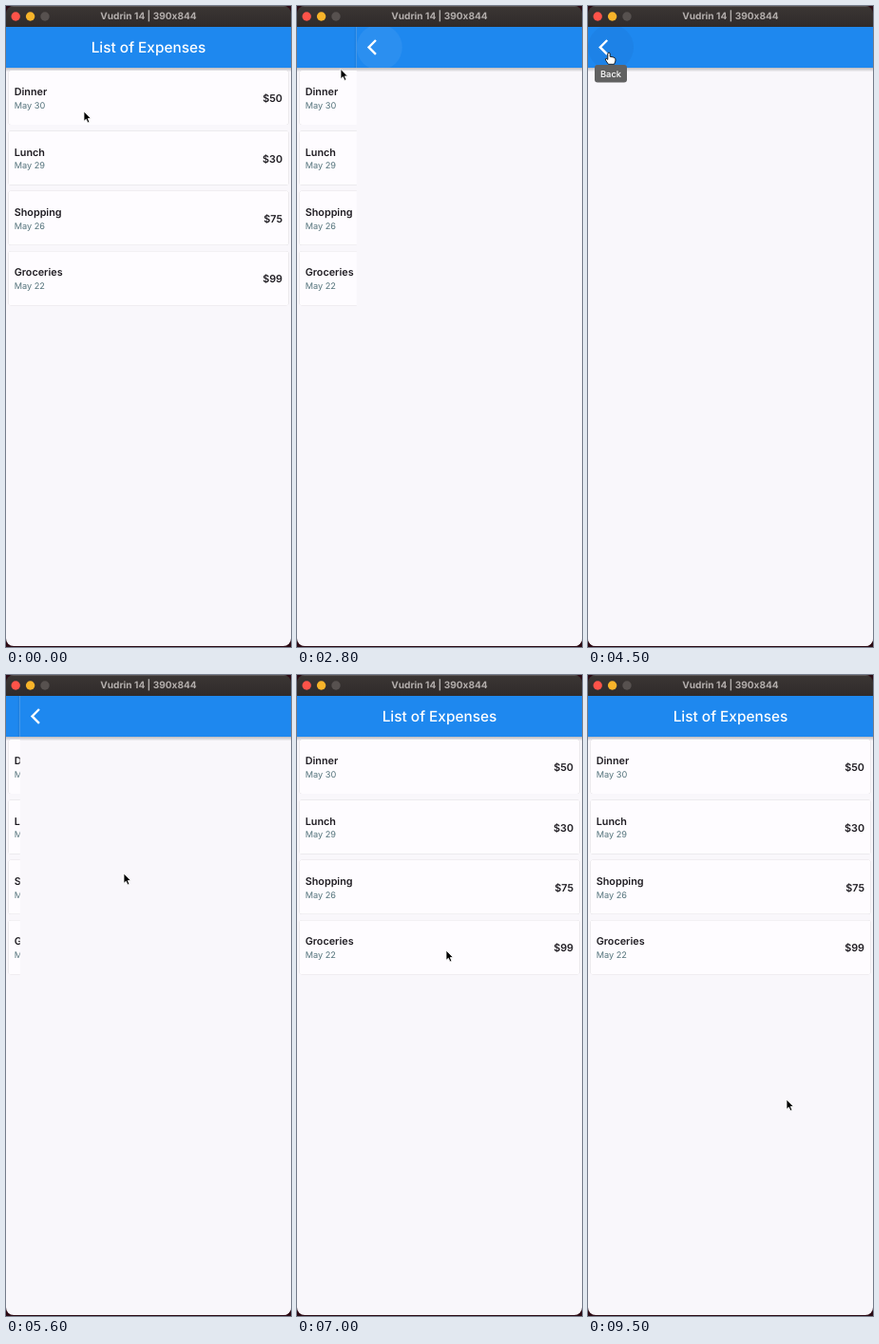
An HTML page that plays this animation: 300 by 675 pixels, repeating every 9.6 s.

```html
<!DOCTYPE html>
<html lang="en">
<head>
<meta charset="utf-8">
<title>List of Expenses</title>
<style>
  html, body { margin: 0; width: 100%; height: 100%; overflow: hidden; background: #2c0a14; }
  svg { display: block; font-family: Inter, Roboto, sans-serif; text-rendering: geometricPrecision; }
  .card { fill: #fefcff; filter: drop-shadow(0 .9px .5px rgba(0, 0, 0, .24)); }
  .name, .amount { font-size: 10.8px; font-weight: 600; fill: #1f1c22; }
  .amount { text-anchor: end; }
  .date { font-size: 9.2px; fill: #54737b; }
  .mid { text-anchor: middle; }
</style>
</head>
<body>
<svg width="300" height="675" viewBox="0 0 300 675">
  <defs>
    <clipPath id="window"><rect width="300" height="674" rx="8"/></clipPath>
    <clipPath id="bar"><rect y="22" width="300" height="43"/></clipPath>
    <linearGradient id="below" x2="0" y2="1">
      <stop stop-color="#000" stop-opacity=".24"/><stop offset="1" stop-color="#000" stop-opacity="0"/>
    </linearGradient>
    <linearGradient id="edge">
      <stop stop-color="#000" stop-opacity="0"/><stop offset="1" stop-color="#000" stop-opacity=".1"/>
    </linearGradient>
    <linearGradient id="chrome" x2="0" y2="1">
      <stop stop-color="#3b3634"/><stop offset="1" stop-color="#302b2a"/>
    </linearGradient>
    <g id="screen">
      <rect y="22" width="300" height="653" fill="#f9f7fb"/>
      <rect y="65" width="300" height="4.5" fill="url(#below)"/>
      <rect y="22" width="300" height="43" fill="#1e88ef"/>
    </g>
  </defs>
  <g clip-path="url(#window)">
    <use href="#screen"/>
    <text class="mid" x="150" y="49" font-size="15.4" font-weight="500" fill="#fff">List of Expenses</text>
    <g id="list"></g>

    <g id="page">
      <rect x="-3" y="22" width="3" height="43" fill="url(#edge)"/>
      <use href="#screen"/>
      <circle id="ink" cx="24" cy="43.5" r="24" clip-path="url(#bar)"/>
      <path d="M20.2 36 12.8 43.4 20.2 50.8" fill="none" stroke="#fff" stroke-width="2.4"/>
    </g>

    <g id="tooltip">
      <rect x="7" y="62" width="34" height="18.5" rx="3" fill="#616161"/>
      <text class="mid" x="24" y="75" font-size="9.4" font-weight="500" fill="#fff">Back</text>
    </g>

    <rect width="300" height="22" fill="url(#chrome)"/>
    <rect width="300" height=".7" fill="#6a6462"/>
    <g id="lights"></g>
    <text class="mid" x="150" y="14.2" font-size="10.1" font-weight="700" fill="#b3aeac">Vudrin 14 | 390x844</text>

    <path id="arrow" d="M0 0V10.3L2.4 8.2 4 12 5.9 11.2 4.3 7.5H7.4Z" fill="#000" stroke="#fff" stroke-width=".8"/>
    <path id="hand" d="M-1.2 .8Q0-.8 1.2 .8V4.3L5 5 6.9 6.4V9L5.6 12.3H-.6L-3.4 8.1Q-4.2 6.4-2.8 6.2L-1.2 7.4Z" fill="#fff" stroke="#111" stroke-width=".9" stroke-linejoin="round"/>
  </g>
</svg>
<script>
const LOOP = 9600, STEP = 100, SLIDE = 500, WIDTH = 300;
const APPROACH = 600, HOVER = 250, RELEASE = 60;
const $ = id => document.getElementById(id);
const clamp = v => Math.min(1, Math.max(0, v));
const mix = (a, b, k) => a + (b - a) * k;

const expenses = [
  ["Dinner", "May 30", 50], ["Lunch", "May 29", 30],
  ["Shopping", "May 26", 75], ["Groceries", "May 22", 99]
];
$("list").innerHTML = expenses.map(([name, date, amount], i) => `
  <g transform="translate(0 ${68 + i * 63.4})">
    <rect class="card" x="2.5" width="295" height="57" rx="2.5"/>
    <text class="name" x="8.7" y="26.2">${name}</text>
    <text class="date" x="8.7" y="40">${date}</text>
    <text class="amount" x="291" y="33.3">$${amount}</text>
  </g>`).join("");
$("lights").innerHTML = ["#fe5349", "#f8b42a", "#57514f"].map((fill, i) =>
  `<circle cx="${10.2 + i * 15.4}" cy="11" r="4.7" fill="${fill}"/>`).join("");

// The pointer reaches a card, opens it, then taps the back button
const visits = [
  { arrive: 1100, card: [125, 100], open: 1250, back: 2760, button: [22, 48] },
  { arrive: 3200, card: [142, 140], open: 3380, back: 4600, button: [22, 49] },
  { arrive: 5100, card: [124, 209], open: 5310, back: 6450, button: [22, 49] },
  { arrive: 6900, card: [157, 290], open: 7350, back: 8650, button: [11, 45] }
];

// Straight pointer moves, each starting where the previous one ended
const moves = [{ begin: 0, end: 550, to: [198, 205] }];
let begin = 550;
for (const { arrive, card, back, button } of visits) {
  moves.push({ begin, end: arrive, to: card });
  moves.push({ begin: back - APPROACH, end: back - HOVER, to: button });
  begin = back - RELEASE;
}
moves.push({ begin, end: 9500, to: [209, 447] });

function pointer(t) {
  let spot = [82, 111];
  for (const { begin, end, to } of moves) {
    const k = clamp((t - begin) / (end - begin));
    spot = spot.map((v, i) => mix(v, to[i], k));
  }
  return spot;
}

const bezier = (a, b, t) => 3 * (1 - t) ** 2 * t * a + 3 * (1 - t) * t * t * b + t ** 3;

// cubic-bezier(.35, .91, .33, .97)
function ease(p) {
  if (p <= 0 || p >= 1) return clamp(p);
  let low = 0, high = 1;
  for (let i = 0; i < 24; i++) {
    const mid = (low + high) / 2;
    if (bezier(.35, .33, mid) < p) low = mid; else high = mid;
  }
  return bezier(.91, .97, low);
}

function place(id, x, y, shown) {
  $(id).setAttribute("transform", `translate(${x} ${y})`);
  $(id).style.display = shown ? "" : "none";
}

function draw(t) {
  const { open, back } = visits.findLast(v => t >= v.open) || visits[0];
  const hover = back - HOVER;
  const leaving = t >= back;
  const offset = leaving ? ease((t - back) / SLIDE) : 1 - ease((t - open) / SLIDE);
  place("page", offset * WIDTH, 0, offset < 1);

  $("ink").setAttribute("fill", leaving ? "#fff" : "#003");
  $("ink").style.opacity = leaving ? .06 * clamp(1 - (t - back - 50) / 300) : .045 * clamp((t - hover) / 100);
  $("tooltip").style.opacity = clamp(Math.min((t - hover) / 130, (back - t) / 75));

  const [x, y] = pointer(t);
  const hovering = t >= hover && t < back - RELEASE;
  place("arrow", x, y, !hovering);
  place("hand", x, y, hovering);
}

const start = performance.now();
function tick() {
  const t = (performance.now() - start) % LOOP;
  draw(Math.floor(t / STEP) * STEP);
  requestAnimationFrame(tick);
}
tick();
</script>
</body>
</html>
```
